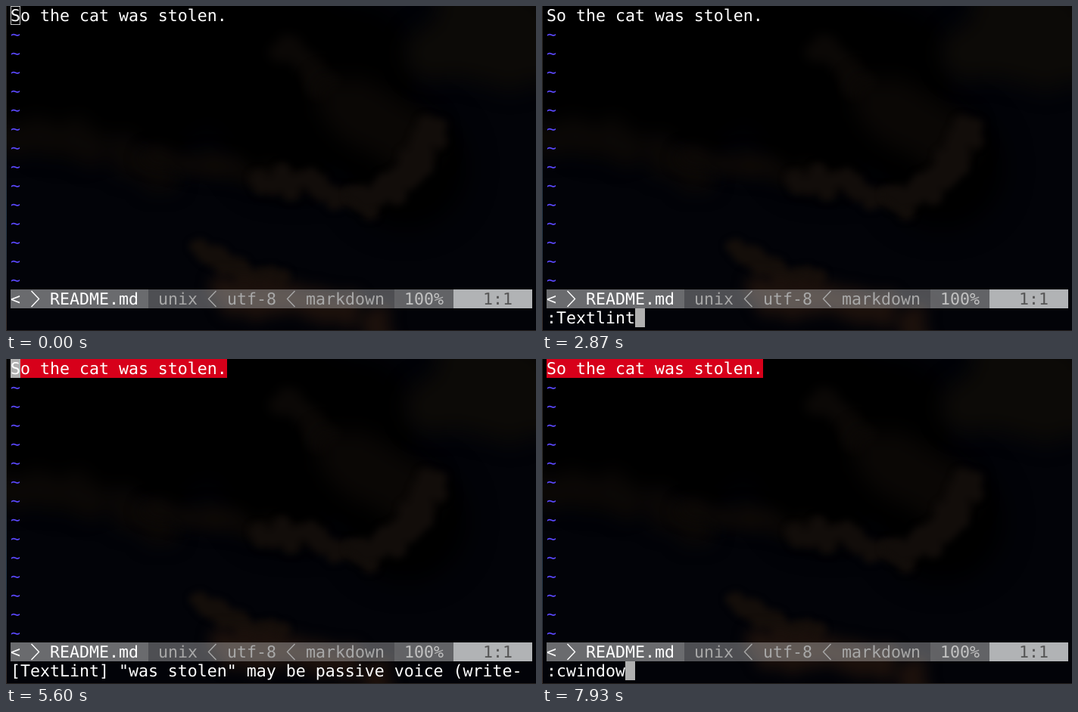
An HTML page with a canvas for the animation above (8 s loop, 700 px wide and 430 px high).

```html
<!DOCTYPE html>
<html lang="en">
<head>
<meta charset="utf-8">
<title>Terminal editor</title>
<style>
  html, body { margin: 0; width: 100%; height: 100%; overflow: hidden; background: #000; }
  #stage { position: relative; width: 700px; height: 430px; overflow: hidden;
    font: 21.593px/25px "DejaVu Sans Mono", monospace;
    text-rendering: geometricPrecision; color: #fff; }
  #stage > * { position: absolute; left: 0; top: 0; }
  #stage > .row { height: 25px; white-space: pre; transform: translateY(1px); }
  #stage > #mark { left: 6px; width: 286px; height: 25px; background: #d7001a; }
  #cursor { width: 13px; height: 25px; box-sizing: border-box; background: #b0b0b0; }
  #cursor.hollow { background: none; border: 1px solid #c4c4c4; }
</style>
</head>
<body>
<div id="stage">
  <canvas id="sky" width="700" height="430"></canvas>
  <div id="mark"></div>
  <div id="cursor"></div>
</div>
<script>
const LOOP = 8000, CELL = 13, LINE = 25, LEFT = 6;
const STATUS_ROW = 15, COMMAND_ROW = 16;
const $ = id => document.getElementById(id);
const stage = $('stage'), cursor = $('cursor'), mark = $('mark');
const ctx = $('sky').getContext('2d');

let seed = 7;
const random = () => (seed = seed * 16807 % 2147483647) / 2147483647;

// A cloud bank: random puffs scattered along a curve from a to c, bent towards b.
function bank(color, blur, width, a, b, c) {
  const along = (k, u) => (1 - u) ** 2 * a[k] + 2 * u * (1 - u) * b[k] + u * u * c[k];
  ctx.filter = `blur(${blur}px)`;
  ctx.fillStyle = color;
  ctx.beginPath();
  for (let u = 0; u <= 1; u += .02) {
    const x = along(0, u) + (random() - .5) * width;
    const y = along(1, u) + (random() - .5) * width;
    const r = width * (.2 + .35 * random());
    ctx.moveTo(x + r, y);
    ctx.arc(x, y, r, 0, 2 * Math.PI);
  }
  ctx.fill();
  ctx.filter = 'none';
}

function drawSky() {
  ctx.fillStyle = '#020308';
  ctx.fillRect(0, 0, 700, 430);
  bank('#000', 18, 150, [-20, 60], [240, 30], [490, 170]);
  bank('#0b0806', 12, 32, [-10, 165], [120, 175], [220, 222]);
  bank('#0d0906', 10, 22, [180, 205], [290, 212], [400, 230]);
  bank('#0b0806', 7, 24, [365, 52], [400, 70], [425, 115]);
  bank('#0a0705', 14, 45, [430, 115], [500, 150], [540, 180]);
  bank('#120d0a', 5, 24, [345, 228], [430, 240], [480, 268]);
  bank('#120d0a', 5, 26, [470, 262], [545, 225], [570, 150]);
  bank('#0c0a07', 14, 70, [590, 30], [650, 30], [700, 60]);
  bank('#140e0a', 4, 20, [252, 318], [280, 350], [370, 368]);
  bank('#1c110c', 9, 32, [290, 380], [420, 390], [510, 425]);

  const edge = ctx.createLinearGradient(0, 0, 0, 430);
  ['#292522', '#30302f', '#25384a', '#3a302b'].forEach((color, i) => edge.addColorStop(i / 3, color));
  ctx.fillStyle = edge;
  ctx.fillRect(0, 0, 1, 430);
  ctx.fillStyle = '#25211f';
  ctx.fillRect(0, 429, 700, 1);
}

function segment(from, to, color) {
  ctx.fillStyle = color;
  ctx.fillRect(LEFT + from * CELL, STATUS_ROW * LINE, (to - from) * CELL, LINE);
}

function chevron(col, dir, color) {
  const mid = LEFT + (col + .5) * CELL, top = STATUS_ROW * LINE;
  ctx.strokeStyle = color;
  ctx.lineWidth = 1.4;
  ctx.beginPath();
  ctx.moveTo(mid - 5 * dir, top + 2);
  ctx.lineTo(mid + 5 * dir, top + LINE / 2);
  ctx.lineTo(mid - 5 * dir, top + LINE - 2);
  ctx.stroke();
}

function label(text, col, row, color = '#fff') {
  const el = document.createElement('div');
  el.className = 'row';
  el.textContent = text;
  el.style.left = LEFT + col * CELL + 'px';
  el.style.top = row * LINE + 'px';
  el.style.color = color;
  stage.append(el);
  return el;
}

function drawStatus() {
  const dim = '#a8a8a8';
  segment(0, 14, 'rgba(255,255,255,.41)');
  segment(14, 39, 'rgba(255,255,255,.3)');
  segment(39, 45, 'rgba(255,255,255,.38)');
  segment(45, 53, '#b1b3b5');
  chevron(2, 1, '#fff');
  chevron(20, -1, dim);
  chevron(28, -1, dim);
  label('<', 0, STATUS_ROW);
  label('README.md', 4, STATUS_ROW);
  label('unix', 15, STATUS_ROW, dim);
  label('utf-8', 22, STATUS_ROW, dim);
  label('markdown', 30, STATUS_ROW, dim);
  label('100%', 40, STATUS_ROW, '#c2c2c2');
  label('1:1', 48, STATUS_ROW, '#555');
}

drawSky();
drawStatus();
label('So the cat was stolen.', 0, 0);
for (let row = 1; row < STATUS_ROW; row++) label('~', 0, row, '#5b48ff');
const command = label('', 0, COMMAND_ROW);

const MESSAGE = '[TextLint] "was stolen" may be passive voice (write-';
const CONFIG = '@qem/textlint-config-readme';
const FOCUS = 330, OPEN = 1530, PASTE = 3700, ENTER = 4700, RESULT = 5130, REOPEN = 6610;
const KEY_GAP = 115;

// The part of a text typed by time t, one character per key gap.
const typed = (text, start, t) =>
  text.slice(0, Math.max(0, Math.floor((t - start) / KEY_GAP) + 1));

function commandText(t) {
  if (t < OPEN) return '';
  if (t < RESULT) {
    return ':' + typed('Textlint', 1750, t) + typed(' -c ', 2950, t) + (t >= PASTE ? CONFIG : '');
  }
  if (t < REOPEN) return MESSAGE;
  return ':' + typed('cwindow', 6850, t);
}

function render(t) {
  const text = commandText(t);
  const typing = (t >= OPEN && t < ENTER) || t >= REOPEN;
  command.textContent = text;
  mark.style.display = t >= RESULT ? 'block' : 'none';
  cursor.className = t < FOCUS ? 'hollow' : '';
  cursor.style.left = LEFT + (typing ? text.length * CELL : 0) + 'px';
  cursor.style.top = (typing ? COMMAND_ROW * LINE : 0) + 'px';
}

const begin = performance.now();
function tick() {
  render((performance.now() - begin) % LOOP);
  requestAnimationFrame(tick);
}
tick();
</script>
</body>
</html>
```
